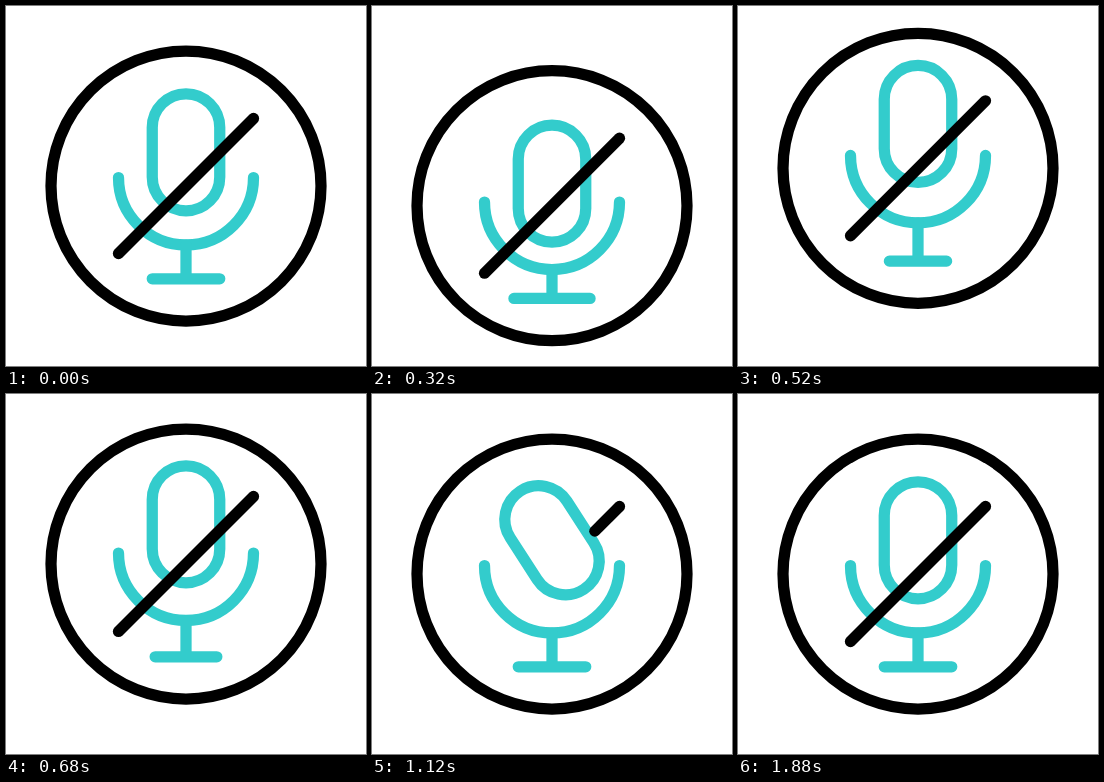
Write an HTML page that moves like this. It is 360 by 360 pixels and loops after 2000 ms.

```html
<!DOCTYPE html>
<html lang="en">
<head>
<meta charset="utf-8">
<title>Microphone muted</title>
<style>
  html, body { margin: 0; width: 100%; height: 100%; overflow: hidden; background: #fff; }
  svg { display: block; width: 100%; height: 100%; }
  g, path { fill: none; stroke-width: 11.25; stroke-linecap: round; stroke-linejoin: round; }
</style>
</head>
<body>
<svg viewBox="0 0 360 360">
  <g stroke="#33cccc">
    <rect id="capsule" x="146.25" y="87.75" width="67.5" height="117" rx="33.75"/>
    <path id="cradle" d="M112.5 171.5a67.5 67.5 0 0 0 135 0"/>
    <path id="stand"/>
  </g>
  <g id="frame" stroke="#000">
    <circle cx="180" cy="180" r="135"/>
    <path id="slash"/>
  </g>
</svg>
<script>
  const LOOP = 2000, STEP = 40;
  const [capsule, cradle, stand, frame, slash] =
    ['capsule', 'cradle', 'stand', 'frame', 'slash'].map(id => document.getElementById(id));

  // Eased progress from 0 to 1 between two times
  function ease(t, from, to) {
    const p = Math.min(1, Math.max(0, (t - from) / (to - from)));
    return p * p * (3 - 2 * p);
  }

  const shift = (el, y, more = '') => el.setAttribute('transform', `translate(0 ${y}) ${more}`);

  function draw(t) {
    const bounce = 22 * ease(t, 40, 280) - 42 * ease(t, 280, 560) + 20 * ease(t, 560, 800);
    const erase = ease(t, 800, 1240);
    const redraw = ease(t, 1320, 1800);

    shift(frame, bounce);
    shift(cradle, bounce * 1.25);
    shift(capsule, bounce * 1.6, `rotate(${180 * erase} 180 146.25)`);

    const half = 33.75 + bounce * (bounce > 0 ? 0.22 : 0.29);
    const top = 239 + bounce * 1.25, base = 272.8 + bounce;
    stand.setAttribute('d', `M180 ${top}V${base}M${180 - half} ${base}H${180 + half}`);

    const start = erase < 1 ? erase : 0;
    const end = erase < 1 ? 1 : redraw;
    const point = p => `${112.5 + 135 * p} ${247.5 - 135 * p}`;
    slash.setAttribute('d', end > start ? `M${point(start)}L${point(end)}` : '');
  }

  const origin = performance.now();
  function tick() {
    const t = (performance.now() - origin) % LOOP;
    draw(Math.floor(t / STEP) * STEP);
    requestAnimationFrame(tick);
  }
  draw(0);
  requestAnimationFrame(tick);
</script>
</body>
</html>
```
